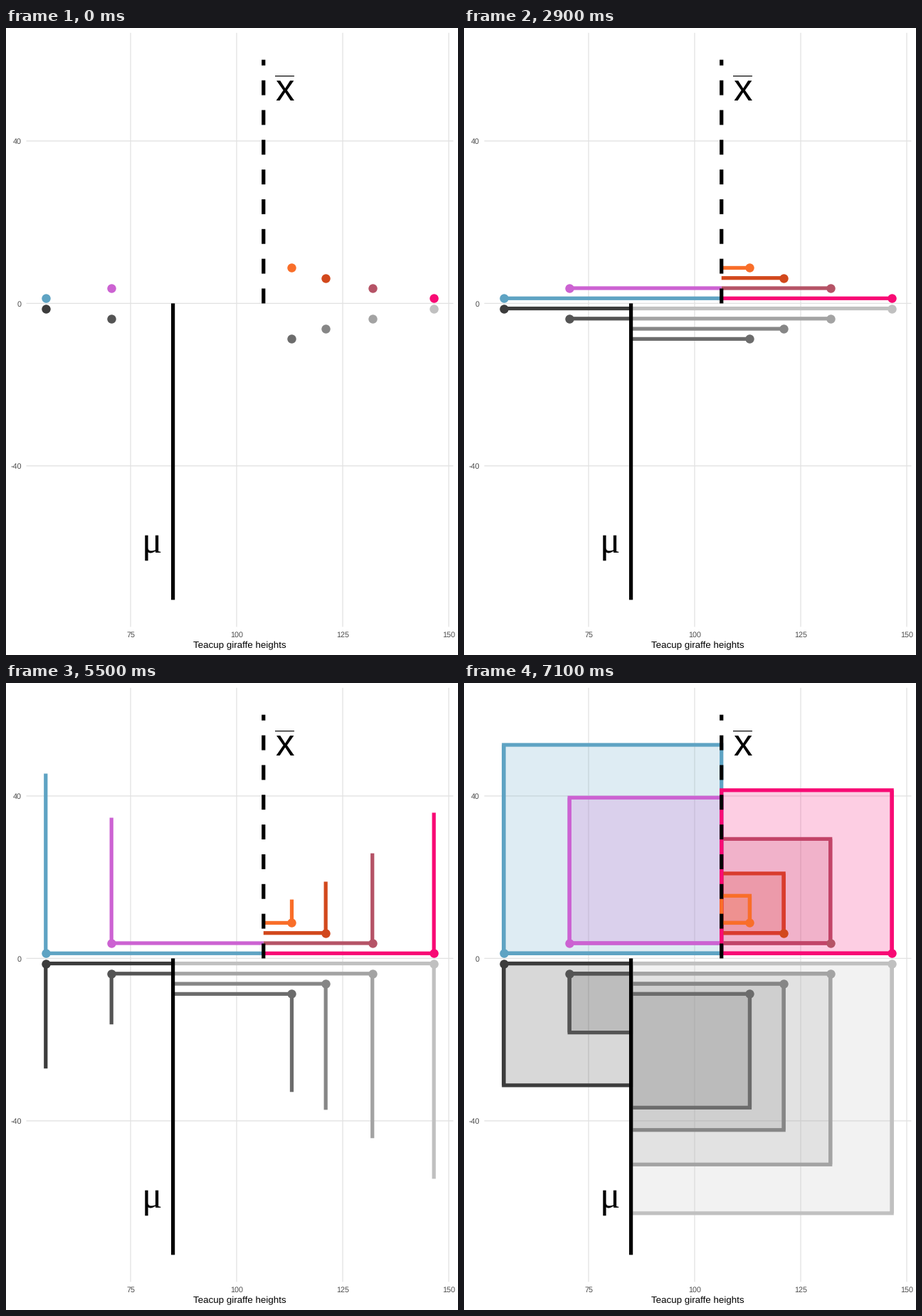
Animation, 635 px wide and 882 px high, one loop 8.6 s. Source, as a matplotlib script:

```python
import matplotlib.pyplot as plt
from matplotlib.animation import FuncAnimation
from matplotlib.colors import to_rgba
from matplotlib.patches import Rectangle

W, H, DPI = 635, 882, 64
PT = 72 / DPI              # points per pixel
LINE = 5.23                # heavy line width in pixels
GROW, FADE, FRAMES = 29, 11, 86

plt.rcParams.update({
    "font.family": "Liberation Sans",
    "path.snap": False,
    "text.hinting": "none",
})

HEIGHTS = [55, 70.5, 113, 121, 132, 146.5]
LEVELS = [1.25, 3.75, 8.75, 6.25, 3.75, 1.25]
COLORS = ["#5ea3c3", "#cc62d2", "#f96e29", "#d2481c", "#b55366", "#f80a74"]
GREYS = ["#3c3c3c", "#545454", "#6c6c6c", "#868686", "#a3a3a3", "#c0c0c0"]
TOP_ORDER = [0, 4, 1, 3, 5, 2]
LOW_ORDER = [0, 1, 5, 4, 3, 2]
MEAN = sum(HEIGHTS) / len(HEIGHTS)
MU = 85


def px(x):
    return 175 + (x - 75) * 5.96


def py(y):
    return 387.4 - y * 5.7125


fig = plt.figure(figsize=(W / DPI, H / DPI), dpi=DPI, facecolor="white")
ax = fig.add_axes([0, 0, 1, 1])
ax.set_xlim(0, W)
ax.set_ylim(H, 0)
ax.axis("off")


def line(xs, ys, color, width=LINE, z=2, **kw):
    kw.setdefault("solid_capstyle", "butt")
    return ax.plot(xs, ys, color=color, lw=width * PT, zorder=z, **kw)[0]


def label(x, y, text, size, color="black", ha="center", **kw):
    ax.text(x, y, text, fontsize=size * PT, color=color, ha=ha,
            va="baseline", zorder=7, **kw)


def draw_axes():
    grid, tick = "#e2e2e2", "#4d4d4d"
    for y in (40, 0, -40):
        line([28.5, 628.4], [py(y)] * 2, grid, 1.3, 1)
        label(22, py(y) + 4, str(y), 10.75, tick, "right")
    for x in (75, 100, 125, 150):
        line([px(x)] * 2, [6.8, 842.4], grid, 1.3, 1)
        label(px(x), 857, str(x), 10.75, tick)
    label(328.4, 872.3, "Teacup giraffe heights", 13.4)


def draw_centres():
    line([px(MEAN)] * 2, [py(0), py(60)], "black", z=6,
         linestyle=(0, (4, 4)), dash_capstyle="butt")
    line([px(MU)] * 2, [py(0), py(-73)], "black", z=6)
    label(391.5, 102, "x", 53)
    line([378, 405], [67.6, 67.6], "black", 1.2, 7)
    label(205, 737.5, "\u03bc", 53, family="Liberation Serif")


class Deviation:
    """One point, its distance to a centre, and the square of that distance."""

    def __init__(self, x, y, centre, color, z):
        self.x, self.y, self.centre, self.color = x, y, centre, color
        self.rise = abs(x - centre) * (1 if y > 0 else -1)
        self.across = line([], [], color)
        self.up = line([], [], color)
        self.square = Rectangle(
            (px(x), py(y)), px(centre) - px(x), py(y + self.rise) - py(y),
            lw=LINE * PT, joinstyle="miter", zorder=z)
        ax.add_patch(self.square)
        ax.plot(px(x), py(y), "o", ms=12.4 * PT, mew=0, color=color, zorder=5)

    def update(self, across, up, fade):
        x, y = px(self.x), py(self.y)
        self.across.set_data([x, px(self.x + (self.centre - self.x) * across)],
                             [y, y])
        self.up.set_data([x, x], [y, py(self.y + self.rise * up)])
        self.square.set_facecolor(to_rgba(self.color, 0.2 * fade))
        self.square.set_edgecolor(to_rgba(self.color, fade))
        self.square.set_visible(fade > 0)
        return [self.across, self.up, self.square]


def build(order, side, centre, colors):
    return [Deviation(HEIGHTS[i], side * LEVELS[i], centre, colors[i],
                      3 + 0.1 * k) for k, i in enumerate(order)]


def progress(frame, start, steps):
    return min(max((frame - start) / steps, 0), 1)


draw_axes()
draw_centres()
deviations = (build(TOP_ORDER, 1, MEAN, COLORS)
              + build(LOW_ORDER, -1, MU, GREYS))


def update(frame):
    state = (progress(frame, 0, GROW),
             progress(frame, GROW + 1, GROW),
             progress(frame, 2 * GROW + 2, FADE))
    return [artist for d in deviations for artist in d.update(*state)]


anim = FuncAnimation(fig, update, frames=FRAMES, interval=100,
                     init_func=lambda: update(0), repeat=True, repeat_delay=0)
plt.show()
```
